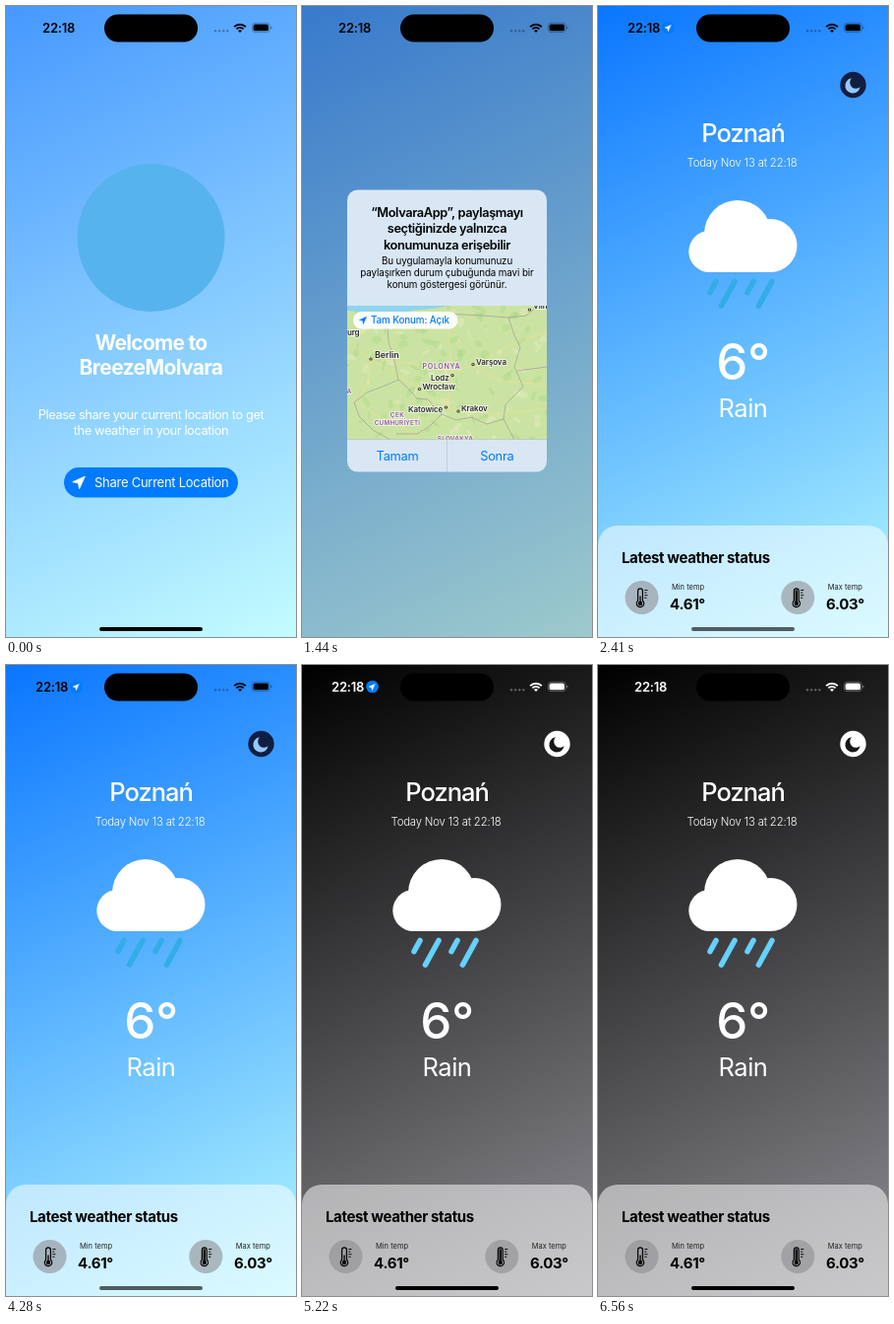
An HTML page with a canvas that plays this animation: 295 by 640 pixels, repeating every 8000 ms.

```html
<!DOCTYPE html>
<html lang="en">
<head>
<meta charset="utf-8">
<title>Weather</title>
<style>
html, body { margin: 0; width: 100%; height: 100%; overflow: hidden; background: #4a9bff; }
canvas { display: block; width: 100vw; height: 100vh; }
</style>
</head>
<body>
<canvas id="stage"></canvas>
<script>
const W = 295, H = 640, LOOP = 8000, MID = W / 2;
const BLUE = [0, 122, 255], BLACK = [0, 0, 0], WHITE = [255, 255, 255];
const stage = document.getElementById('stage');
const screen = stage.getContext('2d');
const layer = document.createElement('canvas').getContext('2d');
let c = screen;

const clamp = v => Math.max(0, Math.min(1, v));
const smooth = v => v * v * (3 - 2 * v);
const mix = (a, b, p) => a.map((v, i) => v + (b[i] - v) * p);
const rgb = (v, a = 1) => `rgba(${v.map(Math.round).join()},${a})`;

// Progress from a to b that advances in n held poses.
function held(t, a, b, n) {
  if (t < a) return 0;
  return Math.min(n - 1, Math.floor((t - a) / (b - a) * (n - 1) + 1e-6)) / (n - 1);
}

function text(s, x, y, size, { weight = 400, color = '#fff', align = 'center', track = -0.03, halo } = {}) {
  c.font = `${weight} ${size}px Inter, "Open Sans", sans-serif`;
  c.letterSpacing = track * size + 'px';
  c.textAlign = align;
  if (halo) {
    c.strokeStyle = halo;
    c.lineWidth = 2;
    c.lineJoin = 'round';
    c.strokeText(s, x, y);
  }
  c.fillStyle = color;
  c.fillText(s, x, y);
}

function box(x, y, w, h, r, fill) {
  c.beginPath();
  c.roundRect(x, y, w, h, r);
  c.fillStyle = fill;
  c.fill();
}

function disc(x, y, r, fill) {
  c.beginPath();
  c.arc(x, y, r, 0, 7);
  c.fillStyle = fill;
  c.fill();
}

function line(points, color, width, cap = 'round') {
  c.beginPath();
  points.forEach(([x, y]) => c.lineTo(x, y));
  c.strokeStyle = color;
  c.lineWidth = width;
  c.lineCap = cap;
  c.lineJoin = 'round';
  c.stroke();
}

function arrow(x, y, r, fill) {
  c.beginPath();
  [[1, -1], [-1, -.1], [-.08, .08], [.1, 1]].forEach(([u, v]) => c.lineTo(x + u * r, y + v * r));
  c.closePath();
  c.fillStyle = c.strokeStyle = fill;
  c.lineWidth = r * .15;
  c.lineJoin = 'round';
  c.fill();
  c.stroke();
}

function backdrop(from, to) {
  const g = c.createLinearGradient(0, 0, W, H);
  g.addColorStop(0, rgb(from));
  g.addColorStop(1, rgb(to));
  c.fillStyle = g;
  c.fillRect(0, 0, W, H);
}

function statusBar(ink, located) {
  box(100, 8.5, 95, 28, 14, '#000');
  const solid = rgb(ink);
  text('22:18', 37 - 7 * located, 27, 13, { weight: 600, color: solid, align: 'left', track: -0.015 });
  if (located > 0) {
    c.globalAlpha = located;
    disc(71.5, 22, 6.3, rgb(BLUE));
    arrow(71, 22.4, 3, '#fff');
    c.globalAlpha = 1;
  }
  for (let i = 0; i < 4; i++) disc(213 + i * 4.1, 25.3, 1.2, rgb(ink, .3));
  for (const r of [8.3, 5.1]) {
    c.beginPath();
    c.arc(238, 27, r, -Math.PI * .75, -Math.PI * .25);
    c.strokeStyle = solid;
    c.lineWidth = 1.9;
    c.lineCap = 'butt';
    c.stroke();
  }
  c.beginPath();
  c.moveTo(238, 27);
  c.arc(238, 27, 2.8, -Math.PI * .75, -Math.PI * .25);
  c.fillStyle = solid;
  c.fill();
  c.beginPath();
  c.roundRect(250.3, 17.2, 18, 9.4, 3);
  c.strokeStyle = rgb(ink, .35);
  c.lineWidth = .8;
  c.stroke();
  box(251.6, 18.5, 15.4, 6.8, 1.9, solid);
  box(269.3, 20.4, 1.1, 3, .6, rgb(ink, .4));
}

function welcome() {
  disc(MID, 235, 75, '#57b3ee');
  text('Welcome to', MID, 348.5, 21, { weight: 700, track: -0.035 });
  text('BreezeMolvara', MID, 374, 21, { weight: 700, track: -0.03 });
  text('Please share your current location to get', MID, 418.5, 12.8);
  text('the weather in your location', MID, 435.3, 12.8);
  box(59, 468, 177, 30.5, 15.2, rgb(BLUE));
  arrow(74, 483.4, 6.2, '#fff');
  text('Share Current Location', 90, 488, 13, { align: 'left', track: -0.02 });
}

function city(name, x, y, dotX, dotY, size = 8) {
  disc(dotX, dotY, 1.6, '#222');
  disc(dotX, dotY, .7, '#fff');
  text(name, x, y, size, { weight: 600, color: '#2b2b2b', align: 'left', track: -0.01, halo: 'rgba(255,255,255,.7)' });
}

function country(name, x, y, size, track = .08) {
  text(name, x, y, size, { weight: 600, color: '#9656a8', track, halo: 'rgba(255,255,255,.6)' });
}

function map(labelled) {
  c.save();
  c.beginPath();
  c.rect(46, 304, 203, 135.5);
  c.clip();
  c.fillStyle = '#cbe3a2';
  c.fillRect(46, 304, 203, 136);

  let seed = 11;
  const rnd = () => (seed = seed * 16807 % 2147483647) / 2147483647;
  for (let i = 0; i < 130; i++) {
    const x = 46 + rnd() * 203, y = 304 + rnd() * 136;
    c.beginPath();
    c.ellipse(x, y, 1 + rnd() * 6, 1 + rnd() * 3, rnd() * 3, 0, 7);
    c.fillStyle = rnd() < .6 ? 'rgba(165,212,130,.4)' : 'rgba(228,236,190,.5)';
    c.fill();
  }

  c.beginPath();
  [[46, 304], [150, 304], [132, 307], [112, 309], [92, 314], [70, 311], [46, 309]].forEach(p => c.lineTo(...p));
  c.fillStyle = '#8fd3ec';
  c.fill();

  const roads = [
    [[46, 342], [70, 358], [119, 388], [146, 407], [160, 411], [200, 414], [249, 408]],
    [[70, 358], [110, 362], [153, 372], [174, 363], [210, 345], [249, 330]],
    [[70, 358], [68, 380], [56, 402], [70, 412], [100, 426], [120, 440]],
    [[146, 407], [153, 374], [150, 345], [146, 304]],
    [[174, 363], [200, 380], [249, 384]]
  ];
  roads.forEach(r => line(r, 'rgba(246,222,140,.75)', .8));
  const borders = [
    [[86, 310], [88, 340], [94, 360], [98, 379], [82, 386], [66, 392], [53, 402], [58, 416], [72, 430], [90, 440]],
    [[98, 379], [108, 388], [117, 398], [128, 399], [142, 414], [157, 420], [172, 417], [188, 424], [205, 419]],
    [[142, 414], [130, 426], [117, 434], [96, 434]],
    [[146, 312], [184, 314], [210, 316], [216, 334], [222, 346], [216, 366], [225, 386], [207, 404], [205, 419], [216, 440]],
    [[210, 316], [228, 314], [240, 304]],
    [[219, 370], [249, 366]]
  ];
  borders.forEach(b => line(b, 'rgba(150,130,150,.65)', .8));

  if (labelled) {
    city('Vilnius', 235, 307, 231.5, 308);
    text('urg', 46, 334, 8, { weight: 600, color: '#2b2b2b', align: 'left', halo: 'rgba(255,255,255,.7)' });
    city('Berlin', 74, 357.3, 70, 358, 9);
    city('Varşova', 177, 364, 174, 363.5);
    city('Lodz', 131, 379.5, 153, 374.5);
    city('Wrocław', 122.5, 388.5, 119.5, 388.5);
    city('Katowice', 108, 412, 146.5, 407);
    city('Krakov', 162, 411, 159, 411);
    country('POLONYA', 142, 367.5, 7.2);
    country('ÇEK', 97, 417, 6.3);
    country('CUMHURİYETİ', 97, 425, 6.3, .03);
    country('SLOVAKYA', 156, 441, 6.5, .03);
    country('A', 48, 392.5, 6.5);
  } else {
    c.fillStyle = 'rgba(255,255,255,.4)';
    c.fillRect(46, 304, 203, 136);
  }
  c.restore();

  box(52, 310, 106.5, 17.5, 8.7, 'rgba(255,255,255,.95)');
  arrow(62, 318.8, 3.6, rgb(BLUE));
  text('Tam Konum: Açık', 70, 322.3, 9.8, { weight: 500, color: rgb(BLUE), align: 'left', track: -0.01 });
}

function alertBox(labelled, pressed) {
  c.save();
  c.beginPath();
  c.roundRect(46, 186.5, 203, 286, 10.5);
  c.clip();
  c.fillStyle = '#d9e7f4';
  c.fillRect(46, 186, 203, 288);
  const bold = { weight: 600, color: '#000' }, plain = { color: '#000', track: -0.01 };
  ['“MolvaraApp”, paylaşmayı', 'seçtiğinizde yalnızca', 'konumunuza erişebilir']
    .forEach((s, i) => text(s, MID, 213.5 + i * 16.8, 12.8, bold));
  ['Bu uygulamayla konumunuzu', 'paylaşırken durum çubuğunda mavi bir', 'konum göstergesi görünür.']
    .forEach((s, i) => text(s, MID, 261.8 + i * 12.1, 9.8, plain));
  map(labelled);
  if (pressed) {
    c.fillStyle = 'rgba(40,60,80,.13)';
    c.fillRect(46, 439.5, 101.5, 34);
  }
  line([[46, 439.5], [249, 439.5]], 'rgba(60,80,100,.25)', .6, 'butt');
  line([[MID, 439.5], [MID, 473]], 'rgba(60,80,100,.25)', .6, 'butt');
  text('Tamam', 97, 460.7, 12.8, { color: rgb(BLUE), track: -0.02 });
  text('Sonra', 198.3, 460.7, 12.8, { color: rgb(BLUE), track: -0.02 });
  c.restore();
}

// Paints the alert on its own layer so it fades as one piece.
function showAlert(alpha, scale, ratio, labelled, pressed) {
  c = layer;
  c.setTransform(1, 0, 0, 1, 0, 0);
  c.clearRect(0, 0, c.canvas.width, c.canvas.height);
  c.scale(ratio[0], ratio[1]);
  c.translate(MID, 329.5);
  c.scale(scale, scale);
  c.translate(-MID, -329.5);
  alertBox(labelled, pressed);
  c = screen;
  c.globalAlpha = alpha;
  c.drawImage(layer.canvas, 0, 0, W, H);
  c.globalAlpha = 1;
}

function moonButton(dark) {
  disc(259.5, 80, 13.2, rgb(mix([16, 30, 66], WHITE, dark)));
  c.beginPath();
  c.arc(259, 80.8, 7.6, -1.75, .18, true);
  c.arc(262.4, 77.6, 6.2, .75, -2.3, false);
  c.closePath();
  c.fillStyle = rgb(mix([150, 200, 255], [22, 22, 24], dark));
  c.fill();
}

function cloud(drops) {
  disc(142, 231, 34, '#fff');
  disc(175.5, 243, 27, '#fff');
  disc(113.3, 249, 21, '#fff');
  c.fillRect(113, 240, 62, 30);
  for (const x of [120, 158]) {
    line([[x, 279.5], [x - 6, 290.5]], drops, 5.6);
    line([[x + 19, 279.5], [x + 5.5, 304]], drops, 5.6);
  }
}

function reading(x, label, value, full) {
  disc(x, 600, 17, 'rgba(142,142,147,.6)');
  c.beginPath();
  c.arc(x - 1.5, 606, 3.7, -.85, Math.PI + .85);
  c.arc(x - 1.5, 593.2, 2.4, Math.PI, 0);
  c.closePath();
  c.strokeStyle = '#000';
  c.lineWidth = 1.2;
  c.stroke();
  disc(x - 1.5, 606, 2.2, '#000');
  line([[x - 1.5, 606], [x - 1.5, full ? 593.5 : 599]], '#000', full ? 2.4 : 1.3);
  for (let i = 0; i < 4; i++) line([[x + 3, 592.5 + i * 2.6], [x + (i % 2 ? 4.6 : 5.6), 592.5 + i * 2.6]], '#000', .9);
  text(label, x + 30.5, 592, 7.5, { color: '#222', align: 'left', track: 0 });
  text(value, x + 28.6, 611.8, 15, { weight: 700, color: '#000', align: 'left', track: -0.02 });
}

function weather(dark) {
  moonButton(dark);
  text('Poznań', MID, 138, 25.5, { weight: 500, track: -0.04 });
  text('Today Nov 13 at 22:18', 146.5, 162.7, 11.3, { weight: 300, track: -0.015 });
  cloud(rgb(mix([50, 173, 230], [100, 210, 255], dark)));
  text('6°', MID, 379, 51, { weight: 500, track: -0.01 });
  text('Rain', MID, 417, 25.5, { track: -0.02 });
  box(0, 527, W, 140, 20, 'rgba(255,255,255,.52)');
  text('Latest weather status', 24, 564.5, 15, { weight: 700, color: '#000', align: 'left', track: -0.025 });
  reading(44.5, 'Min temp', '4.61°', false);
  reading(203.3, 'Max temp', '6.03°', true);
}

function draw(t, ratio) {
  const rise = clamp(held(t, 640, 1300, 7) * 1.2 + .08);
  const shown = t < 640 ? 0 : 1 - (1 - rise) ** 2;
  const leave = held(t, 1850, 2410, 6);
  const alpha = t < 1850 ? shown : clamp(1 - (leave * 5 + .6) / 3);
  const night = held(t, 4280, 4790, 6);
  const dark = smooth(night) - smooth(held(t, 5220, 5660, 5)) + smooth(held(t, 5950, 6560, 7));
  const located = t < 2186 ? 0 : 1 - smooth(held(t, 6150, 6560, 5));
  const home = t < 1850 ? 1 - shown : .62 * leave + .38 * night;

  if (t < 2298) {
    backdrop([70, 152, 255], [196, 252, 255]);
    if (t < 500) welcome();
  } else {
    backdrop(mix([10, 118, 255], BLACK, dark), mix([178, 247, 255], [142, 142, 147], dark));
    weather(dark);
  }
  if (alpha > 0) {
    c.fillStyle = `rgba(0,0,0,${.2 * alpha})`;
    c.fillRect(0, 0, W, H);
    showAlert(alpha, 1.214 - .214 * shown, ratio, t >= 1070, t >= 1700);
  }
  statusBar(mix(BLACK, WHITE, dark), located);
  box(95, 630, 105, 4, 2, `rgba(0,0,0,${home})`);
}

function frame(now) {
  const dpr = window.devicePixelRatio || 1;
  const w = Math.round(innerWidth * dpr), h = Math.round(innerHeight * dpr);
  if (stage.width !== w || stage.height !== h) {
    stage.width = layer.canvas.width = w;
    stage.height = layer.canvas.height = h;
  }
  const ratio = [w / W, h / H];
  c = screen;
  c.setTransform(ratio[0], 0, 0, ratio[1], 0, 0);
  draw(now % LOOP, ratio);
  requestAnimationFrame(frame);
}
frame(performance.now());
</script>
</body>
</html>
```
